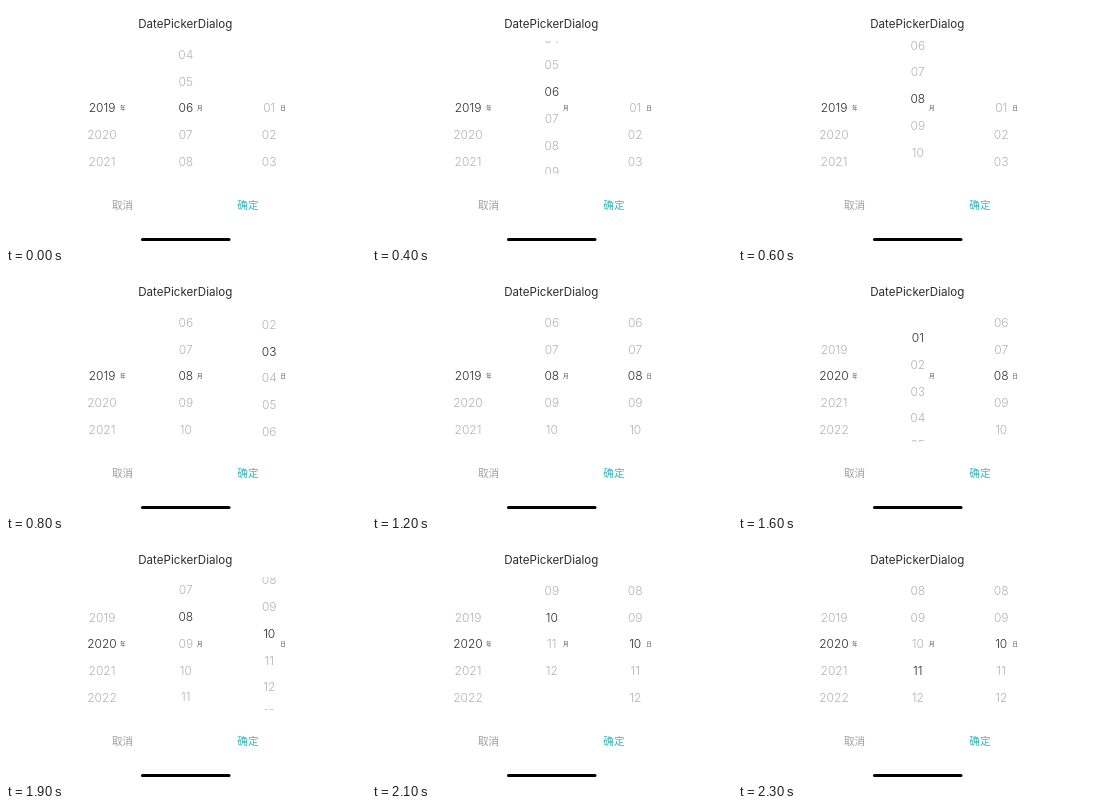
An HTML page with a canvas for the animation above (2400 ms loop, 360 by 240 pixels).

```html
<!DOCTYPE html>
<html lang="zh-CN">
<head>
<meta charset="utf-8">
<title>DatePickerDialog</title>
<style>
html, body { margin: 0; width: 100%; height: 100%; overflow: hidden; background: #fff; }
canvas { display: block; width: 360px; height: 240px; }
</style>
</head>
<body>
<canvas id="stage" width="360" height="240"></canvas>
<script>
const ctx = document.getElementById('stage').getContext('2d');
const LOOP = 2400, STEP = 100;
const ROW = 26.75, MID = 102;
const LAG = 0.4; // the highlight trails the scroll, in steps
const LATIN = 'Inter, "Open Sans", sans-serif';
const CJK = '"Noto Sans CJK SC", "Noto Sans CJK", sans-serif';
const DARK = '#2b2b2b', PALE = '#b3b3b3';

// Each move eases to a value between two steps.
const move = (from, until, to) => ({ from, until, to });

const wheels = [
  { x: 96, min: 2019, max: 2030, unit: '年', ux: 116.7, start: 2019,
    moves: [move(12, 14, 2020)] },
  { x: 179.8, min: 1, max: 12, unit: '月', ux: 193.7, start: 6,
    moves: [move(3, 6, 8.34), move(6, 8, 8), move(14, 14.5, 1), move(14.5, 20.8, 11), move(22.6, 23, 10)] },
  { x: 263.2, min: 1, max: 31, unit: '日', ux: 277, start: 1, unset: true,
    moves: [move(6, 10.5, 8), move(16, 19, 10.39), move(19, 21, 10)] }
];

function ease(u) {
  const c = Math.min(1, Math.max(0, u));
  return c * c * (3 - 2 * c);
}

const position = (w, step) => w.moves.reduce(
  (pos, m) => pos + (m.to - pos) * ease((step - m.from) / (m.until - m.from)), w.start);

function marked(w, step) {
  if (w.unset && step <= w.moves[0].from) return null;
  return Math.floor(position(w, step - LAG) + 0.01);
}

function text(str, x, y, font, color) {
  ctx.font = font;
  ctx.fillStyle = color;
  ctx.fillText(str, x, y);
}

function drawWheel(w, step) {
  const pos = position(w, step), mark = marked(w, step);
  const first = Math.max(w.min, Math.floor(pos) - 3);
  const last = Math.min(w.max, Math.ceil(pos) + 3);
  for (let v = first; v <= last; v++) {
    text(String(v).padStart(2, '0'), w.x, MID + (v - pos) * ROW + 4.3,
      `350 12px ${LATIN}`, v === mark ? DARK : PALE);
  }
}

function draw(now) {
  const step = Math.floor(now % LOOP / STEP);
  ctx.fillStyle = '#fff';
  ctx.fillRect(0, 0, 360, 240);
  ctx.textAlign = 'center';
  text('DatePickerDialog', 179.3, 21.8, `400 11.6px ${LATIN}`, DARK);

  ctx.save();
  ctx.beginPath();
  ctx.rect(0, 35, 360, 133);
  ctx.clip();
  wheels.forEach(w => drawWheel(w, step));
  ctx.restore();

  wheels.forEach(w => text(w.unit, w.ux, 104, `400 5.6px ${CJK}`, '#444'));
  text('取消', 116.6, 203.2, `500 10.6px ${CJK}`, '#9c9c9c');
  text('确定', 241.9, 203.2, `500 10.6px ${CJK}`, '#35b7bd');

  ctx.fillStyle = '#000';
  ctx.beginPath();
  ctx.roundRect(135, 232, 89.5, 3, 1.5);
  ctx.fill();
}

const start = performance.now();
function tick() {
  draw(performance.now() - start);
  requestAnimationFrame(tick);
}
tick();
</script>
</body>
</html>
```
